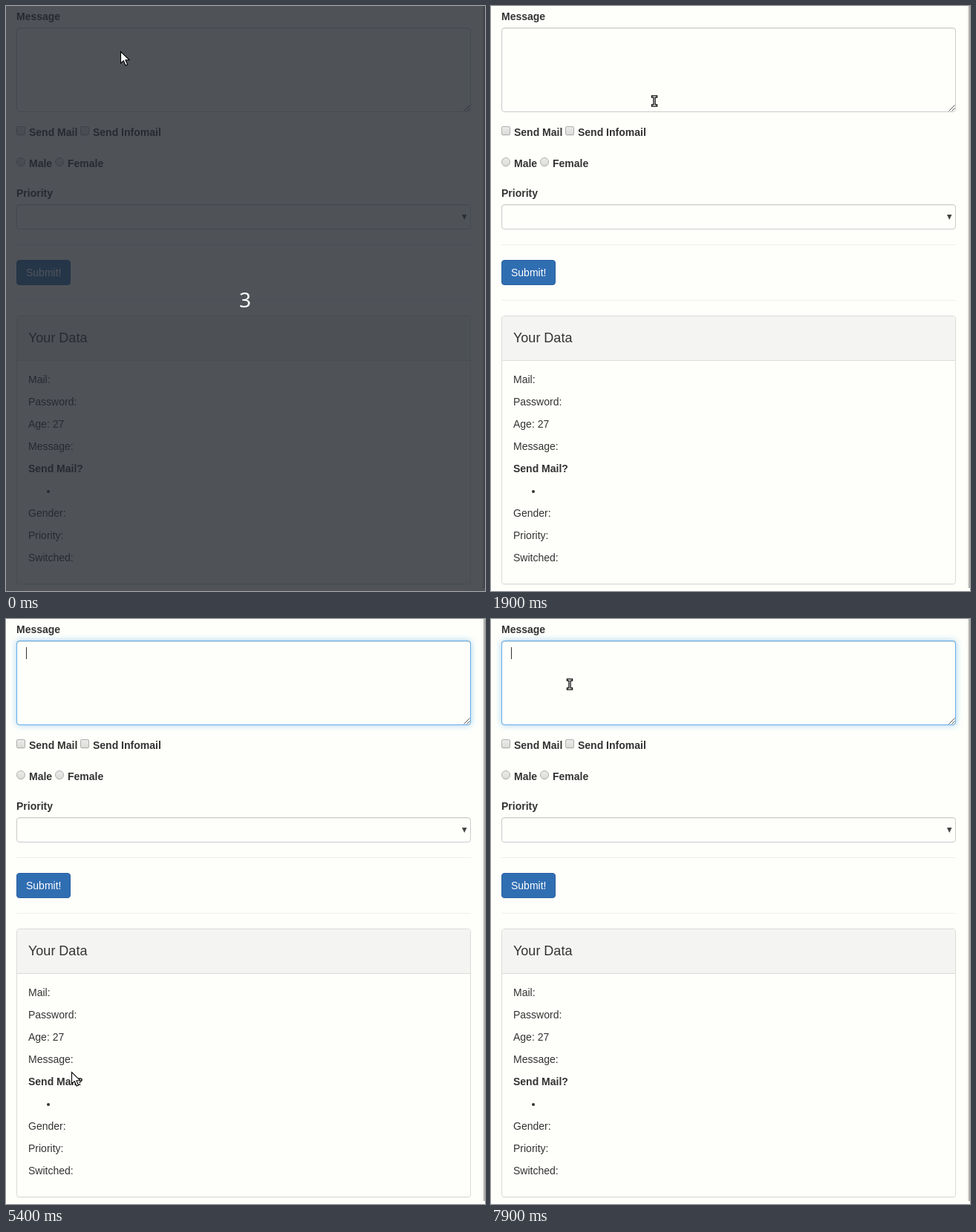
An HTML page that plays this animation: 645x788 px, repeating every 8 s.

```html
<!DOCTYPE html>
<html lang="en">
<head>
<meta charset="utf-8">
<title>Form demo</title>
<style>
html, body { margin: 0; width: 100%; height: 100%; overflow: hidden; background: #fefffb; }
#stage { position: relative; width: 645px; height: 788px; overflow: hidden;
  font: 14px/20px "Liberation Sans", Arial, sans-serif; color: #333; }
#stage * { position: absolute; box-sizing: border-box; white-space: nowrap; }
#stage b { font-weight: 700; }
.field { left: 14px; width: 612px; border: 1px solid #ccc; border-radius: 4px;
  box-shadow: inset 0 1px 1px rgba(0,0,0,.075); }
#glow { top: 29px; height: 114px; border-color: #66afe9; opacity: 0;
  box-shadow: inset 0 1px 1px rgba(0,0,0,.075), 0 0 8px rgba(102,175,233,.6); }
.rule { left: 14px; width: 612px; height: 1px; background: #eeeeeb; }
.box { width: 12px; height: 12px; border: 1px solid #b0b0ae; border-radius: 2px;
  background: linear-gradient(#ebebe9, #dcdcda); box-shadow: 0 1px 1px rgba(0,0,0,.08); }
.round { border-radius: 50%; }
#submit { left: 14px; top: 342px; width: 73px; height: 34px; border: 1px solid #2a60a2;
  border-radius: 4px; background: #306eb2; }
#panel { left: 14px; top: 417px; width: 612px; height: 362px; border: 1px solid #dbdcd9;
  border-radius: 4px; box-shadow: 0 1px 1px rgba(0,0,0,.05); }
#head { left: 0; top: 0; width: 610px; height: 60px; background: #f4f5f2;
  border-bottom: 1px solid #dbdcd9; border-radius: 3px 3px 0 0; }
#title { left: 30px; top: 437px; font-size: 18px; }
#dot { left: 55px; top: 652px; width: 4px; height: 4px; border-radius: 50%; background: #333; }
#sel { left: 30px; top: 585px; height: 16px; line-height: 16px; color: #fff; background: #e94f57; }
#caret { left: 27px; top: 38px; width: 1px; height: 16px; background: #333; }
#popup { left: -12px; top: 602px; width: 28px; height: 27px; background: #f2f3f1;
  border: 1px solid #d2d3d1; border-radius: 3px; }
#popup i { left: 11px; top: 6px; width: 11px; height: 14px; background: #4a69e6; }
#edge { left: 641px; top: 0; width: 4px; height: 784px; background: #f3f3f0; border-right: 2px solid #b3b1af; }
#shade { inset: 0; background: rgba(36,40,48,.8); }
#count { left: 302px; top: 375px; width: 40px; text-align: center; color: #fff;
  font: 28px/40px "Noto Sans", "Open Sans", sans-serif; }
#stage svg { left: 0; top: 0; }
</style>
</head>
<body>
<div id="stage">
  <div class="field" style="top:29px;height:114px"></div>
  <div id="glow" class="field"></div>
  <div id="caret"></div>
  <div class="field" style="top:267px;height:34px"></div>
  <div class="rule" style="top:321px"></div>
  <div class="rule" style="top:396px"></div>
  <div id="submit"></div>
  <div id="panel"><div id="head"></div></div>
  <div id="title">Your Data</div>
  <div id="dot"></div>
  <svg width="645" height="788">
    <path d="M616.5 141.5l8-8M620.5 141.5l4-4" stroke="#555"/>
    <path d="M614 281h6.5l-3.25 7z" fill="#444"/>
  </svg>
  <div id="labels"></div>
  <div id="sel">Message:</div>
  <div id="popup"><i></i></div>
  <div id="edge"></div>
  <div id="shade"></div>
  <div id="count"></div>
  <svg width="645" height="788">
    <path id="arrow" d="M.5 .5V16L4.3 12.6 7 19 9.6 18 6.9 11.7H12Z" fill="#fff" stroke="#000" stroke-width="1.1"/>
    <g id="beam" fill="none" stroke-linecap="square">
      <path d="M-2.5-6H2.5M-2.5 6H2.5M0-6V6" stroke="#000" stroke-width="3.4"/>
      <path d="M-2.5-6H2.5M-2.5 6H2.5M0-6V6" stroke="#fff" stroke-width="1"/>
    </g>
  </svg>
</div>
<script>
const LOOP = 8000;
const $ = id => document.getElementById(id);
const labels = $('labels');

function add(tag, x, y, text = '', cls = '') {
  const el = document.createElement(tag);
  el.textContent = text;
  el.className = cls;
  el.style.cssText = `left:${x}px;top:${y}px`;
  labels.append(el);
  return el;
}

add('b', 14, 4, 'Message');
add('b', 31, 160, 'Send Mail');
add('b', 117, 160, 'Send Infomail');
add('b', 31, 202, 'Male');
add('b', 83, 202, 'Female');
add('b', 14, 242, 'Priority');
add('span', 27, 349, 'Submit!').style.color = '#fff';
for (const x of [14, 100]) add('i', x, 162, '', 'box');
for (const x of [14, 66]) add('i', x, 204, '', 'box round');
['Mail:', 'Password:', 'Age: 27', 'Message:', 'Send Mail?', '', 'Gender:', 'Priority:', 'Switched:']
  .forEach((text, i) => add(i === 4 ? 'b' : 'span', 30, 493 + 30 * i, text));

// Pointer steps: time, shape, x, y
const pointer = [
  [0, 'arrow', 154, 61], [500, 'beam', 157, 63],
  [1800, 'beam', 180, 85], [1900, 'beam', 220, 128], [2000, 'arrow', 243, 178],
  [2300, 'arrow', 238, 170], [2400, 'arrow', 220, 150], [2500, 'beam', 196, 124],
  [2600, 'beam', 176, 104], [2700, 'beam', 168, 97],
  [4800, 'arrow', 166, 150], [4900, 'arrow', 160, 300], [5000, 'arrow', 142, 480],
  [5100, 'arrow', 117, 630], [5200, 'arrow', 100, 691], [5300, 'arrow', 92, 652],
  [5400, 'arrow', 88, 610], [5500, 'beam', 90, 600], [5600, 'beam', 91, 598],
  [5900, 'beam', 91, 597], [6100, 'beam', 58, 597], [6200, 'arrow', 3, 598],
  [6600, 'arrow', 12, 592], [6700, 'arrow', 24, 556], [6800, 'arrow', 50, 470],
  [6900, 'arrow', 90, 350], [7000, 'arrow', 100, 235], [7100, 'arrow', 104, 150],
  [7300, 'beam', 106, 96], [7400, 'beam', 106, 88]
];
const glow = [[0, 0], [4200, 1], [6100, .5], [6200, 0], [7400, .5], [7500, .95], [7900, 1]];
const caret = [[0, 0], [4200, 1], [4800, 0], [5300, 1], [6100, 0], [7400, 1]];
// Unselected width at the left of the word
const selection = [[0, 61], [6100, 28], [6200, 0], [7400, 61]];
const popup = [[0, 0], [6600, 1], [7400, 0]];

const at = (steps, t) => steps.findLast(s => s[0] <= t).slice(1);
const show = (id, on) => { $(id).style.visibility = on ? 'visible' : 'hidden'; };

function draw(t) {
  const [shape, x, y] = at(pointer, t);
  for (const id of ['arrow', 'beam']) show(id, id === shape);
  $(shape).setAttribute('transform', `translate(${x} ${y})`);
  $('glow').style.opacity = at(glow, t)[0];
  show('caret', at(caret, t)[0]);
  $('sel').style.clipPath = `inset(0 0 0 ${at(selection, t)[0]}px)`;
  show('popup', at(popup, t)[0]);
  show('shade', t < 1000);
  show('count', t < 1000);
  $('count').textContent = t < 500 ? '3' : '1';
}

const start = performance.now();
function tick() {
  draw((performance.now() - start) % LOOP);
  requestAnimationFrame(tick);
}
tick();
</script>
</body>
</html>
```
